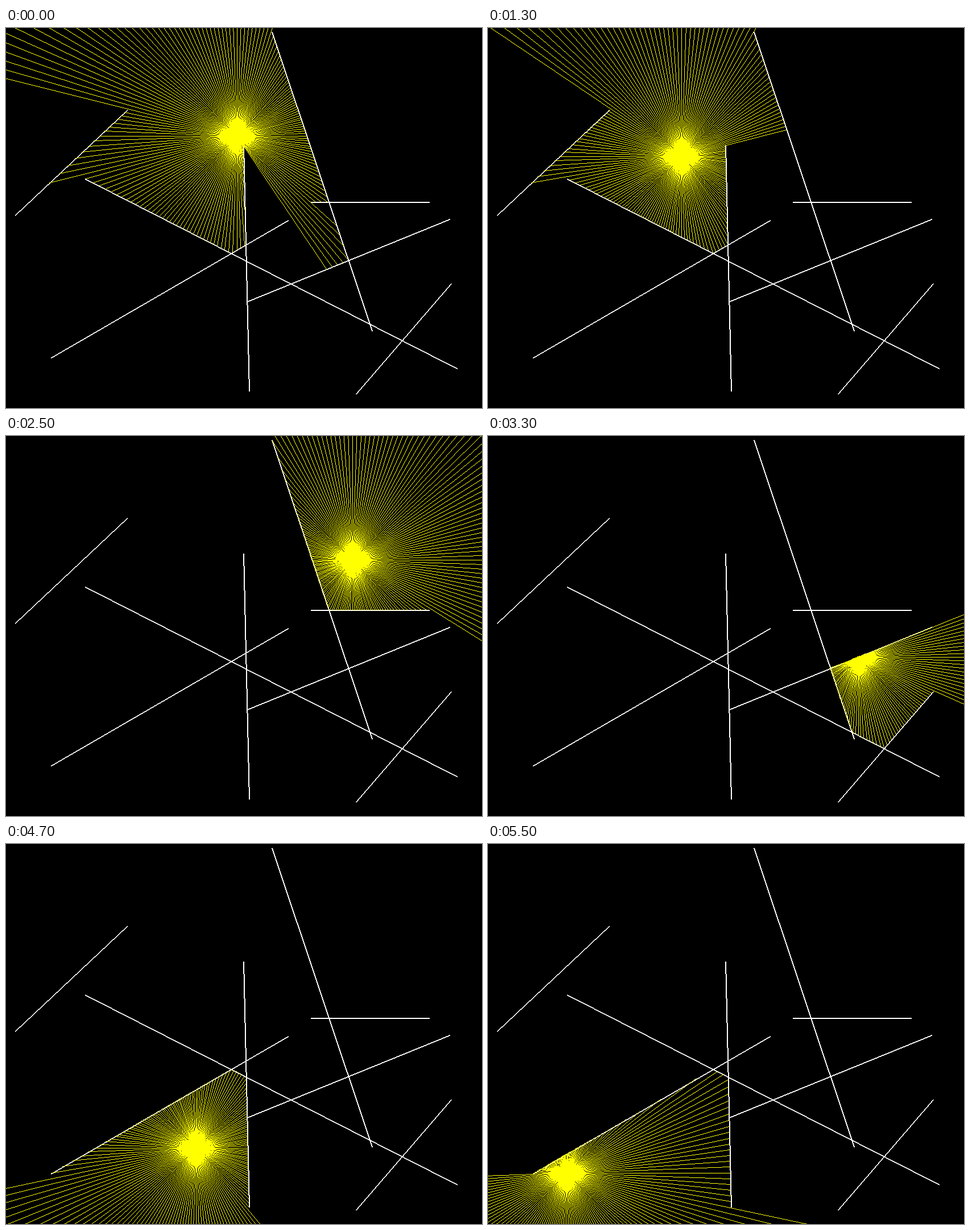
Write an HTML page with a canvas that moves like this. It is 837 px wide and 669 px high and loops after 5.6 s.

```html
<!DOCTYPE html>
<html>
<head>
<meta charset="utf-8">
<title>Ray casting</title>
<style>
html, body { margin: 0; width: 100%; height: 100%; overflow: hidden; background: #000; }
canvas { display: block; }
</style>
</head>
<body>
<canvas id="stage" width="837" height="669"></canvas>
<script>
const W = 837, H = 669, LOOP = 5600, STEP = 100, REACH = W + H;
const ctx = document.getElementById('stage').getContext('2d');
const image = ctx.createImageData(W, H);
const pixels = new Uint32Array(image.data.buffer);
const BLACK = 0xff000000, WHITE = 0xffffffff, YELLOW = 0xff00ffff;

// x1, y1, x2, y2
const walls = [
  [467, 7, 643, 533],
  [213, 144, 16, 329],
  [139, 265, 793, 599],
  [79, 580, 496, 338],
  [417, 207, 427, 639],
  [536, 306, 744, 306],
  [424, 481, 780, 336],
  [782, 450, 615, 644]
];

// Key points of the lamp's path: step, x, y
const path = [
  [0, 406, 190], [6, 143, 217], [12, 340, 226], [17, 485, 123],
  [21, 588, 135], [24, 609, 218], [32, 651, 389], [36, 648, 425],
  [42, 455, 592], [46, 334, 535], [54, 138, 579]
];

function slope(i, axis) {
  const a = path[Math.max(i - 1, 0)], b = path[Math.min(i + 1, path.length - 1)];
  return (b[axis] - a[axis]) / (b[0] - a[0]);
}

// Smooth curve through the key points
function lampAt(step) {
  let i = 0;
  while (i < path.length - 2 && path[i + 1][0] <= step) i++;
  const a = path[i], b = path[i + 1], span = b[0] - a[0];
  const u = (step - a[0]) / span, v = 1 - u;
  return [1, 2].map(axis => Math.round(
    v * v * (1 + 2 * u) * a[axis] + u * u * (3 - 2 * u) * b[axis] +
    span * u * v * (v * slope(i, axis) - u * slope(i + 1, axis))
  ));
}

function line(x, y, x2, y2, color) {
  const dx = Math.abs(x2 - x), dy = -Math.abs(y2 - y);
  const sx = x < x2 ? 1 : -1, sy = y < y2 ? 1 : -1;
  let err = dx + dy;
  for (;;) {
    if (x >= 0 && x < W && y >= 0 && y < H) pixels[y * W + x] = color;
    if (x === x2 && y === y2) return;
    const e = 2 * err;
    if (e >= dy) { err += dy; x += sx; }
    if (e <= dx) { err += dx; y += sy; }
  }
}

// Two pixels thick across the main direction
function drawWall([x1, y1, x2, y2]) {
  const steep = Math.abs(y2 - y1) > Math.abs(x2 - x1);
  const ox = steep ? 1 : 0, oy = 1 - ox;
  line(x1, y1, x2, y2, WHITE);
  line(x1 + ox, y1 + oy, x2 + ox, y2 + oy, WHITE);
}

// Distance along the ray to a wall
function hit(x, y, dx, dy, [x1, y1, x2, y2]) {
  const wx = x2 - x1, wy = y2 - y1;
  const det = dx * wy - dy * wx;
  const px = x1 - x, py = y1 - y;
  const dist = (px * wy - py * wx) / det;
  const along = (px * dy - py * dx) / det;
  return dist > 0 && along >= 0 && along <= 1 ? dist : REACH;
}

function render(step) {
  pixels.fill(BLACK);
  walls.forEach(drawWall);
  const [x, y] = lampAt(step);
  for (let deg = 0; deg < 360; deg += 2) {
    const a = deg * Math.PI / 180, dx = Math.cos(a), dy = Math.sin(a);
    const dist = Math.min(...walls.map(w => hit(x, y, dx, dy, w)));
    line(x, y, Math.floor(x + dx * dist + 1e-6), Math.floor(y + dy * dist + 1e-6), YELLOW);
  }
  ctx.putImageData(image, 0, 0);
}

let shown = -1;
function tick() {
  const step = Math.max(0, Math.floor(performance.now() % LOOP / STEP) - 1);
  if (step !== shown) render(shown = step);
  requestAnimationFrame(tick);
}
tick();
</script>
</body>
</html>
```
